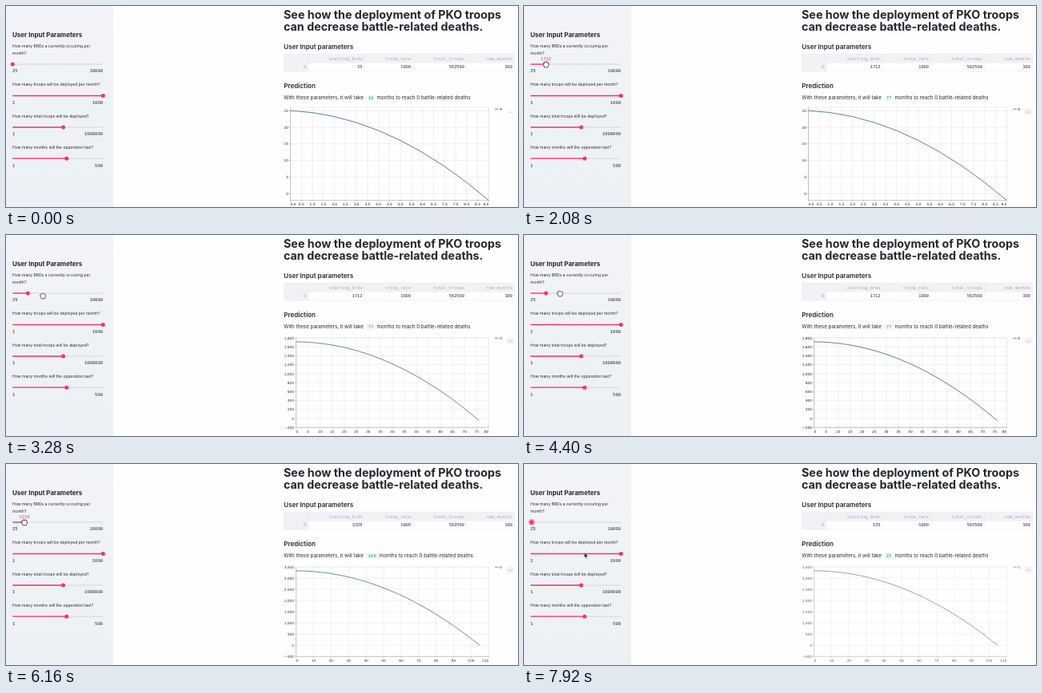
An HTML page that plays this animation: 640x252 px, repeating every 8 s.

```html
<!DOCTYPE html>
<html lang="en">
<head>
<meta charset="utf-8">
<title>Troop deployment dashboard</title>
<style>
html, body { margin: 0; width: 100%; height: 100%; overflow: hidden; background: #fefefe; }
svg { display: block; width: 100vw; height: 100vh; }
text { font: 5px Inter, "Open Sans", sans-serif; fill: #262730; }
.title { font-size: 14.3px; font-weight: 700; }
.head { font-size: 8.05px; font-weight: 600; }
.bold { font-size: 8px; font-weight: 700; }
.body { font-size: 6.25px; }
.mono { font: 5.5px "Liberation Mono", monospace; }
.cell { font: 5.35px "Liberation Mono", monospace; }
.axis { font: 4.3px "DejaVu Sans", sans-serif; fill: #222; }
.grey { fill: #a3a8b4; }
.red { fill: #f63366; }
.green { fill: #09ab3b; }
.end { text-anchor: end; }
.mid { text-anchor: middle; }
</style>
</head>
<body>
<svg id="stage" viewBox="0 0 640 252">
  <defs>
    <linearGradient id="side" x2="0" y2="1">
      <stop stop-color="#f2f4f7"/><stop offset="1" stop-color="#edf0f4"/>
    </linearGradient>
  </defs>
</svg>
<script>
const PINK = '#f63366', stage = document.getElementById('stage');
const $ = id => document.getElementById(id);

const text = (x, y, cls, str, id = '') =>
  `<text x="${x}" y="${y}" class="${cls}"${id && ` id="${id}"`}>${str}</text>`;
const rect = (x, y, w, h, fill) =>
  `<rect x="${x}" y="${y}" width="${w}" height="${h}" fill="${fill}"/>`;
const line = (x1, y1, x2, y2, color, width) =>
  `<path d="M${x1} ${y1}L${x2} ${y2}" stroke="${color}" stroke-width="${width}"/>`;

// Sliders run from x = 8.3 to x = 121.3
const toX = v => 8.3 + (v - 25) / 9975 * 113;

function slider(y, x, label, min, max, id) {
  return text(8, y - 12.4, '', label) +
    line(8.3, y, 121.3, y, '#d3d5da', 1) +
    `<path id="${id}Bar" d="M8.3 ${y}H${x}" stroke="${PINK}" stroke-width="1.3"/>
     <circle id="${id}Glow" cx="${x}" cy="${y}" r="4.2" fill="${PINK}" opacity=".4" display="none"/>
     <circle id="${id}Dot" cx="${x}" cy="${y}" r="2.5" fill="${PINK}"/>` +
    text(8, y + 10.3, 'mono', min) + text(121, y + 10.3, 'mono end', max);
}

// Deaths left after n months
const deaths = (start, n) => start - 0.3 * n * (n + 1);

function chart(id, { start, left, top, bottom, yMin, yMax, yFirst, yStep, xMax, xStep, last }) {
  const right = 603.3;
  const px = v => left + v / xMax * (right - left);
  const py = v => bottom - (v - yMin) / (yMax - yMin) * (bottom - top);
  let out = '';
  for (let v = yFirst; v <= yMax; v += yStep) {
    const y = py(v), name = v.toLocaleString('en-US').replace('-', '\u2212');
    out += line(left, y, right, y, '#ddd', .45) + line(left - 1.9, y, left, y, '#888', .4) +
      text(left - 2.6, y + 1.6, 'axis end', name);
  }
  for (let v = 0; v <= xMax; v += xStep) {
    const x = px(v), cls = v == 0 ? '' : v == xMax ? ' end' : ' mid';
    out += line(x, top, x, bottom, '#ddd', .45) + line(x, bottom, x, bottom + 1.9, '#888', .4) +
      text(x, bottom + 6.3, 'axis' + cls, xStep < 1 ? v.toFixed(1) : v);
  }
  let curve = '';
  for (let n = 0; n <= last; n++) curve += `${px(n)},${py(deaths(start, n))} `;
  return `<g id="${id}">${out}
    <path d="M${left} ${top}V${bottom}H${right}" fill="none" stroke="#888" stroke-width=".45"/>
    <path d="M${left} ${top}H${right}V${bottom}" fill="none" stroke="#ddd" stroke-width=".45"/>
    <polyline points="${curve}" fill="none" stroke="#4c78a8" stroke-width=".95"/></g>`;
}

const columns = [['starting_brds', 445.5, 25], ['troop_rate', 506, 1000],
  ['total_troops', 573, 562500], ['num_months', 633, 300]];

stage.innerHTML += rect(0, 0, 134, 252, 'url(#side)') +
  text(8, 39.2, 'bold', 'User Input Parameters') +
  text(8, 52, '', 'How many BRDs a currently occuring per') +
  slider(73, 8.3, 'month?', 25, 10000, 'brd') +
  slider(112.5, 121.3, 'How many troops will be deployed per month?', 1, 1000, 'rate') +
  slider(152, 71.6, 'How many total troops will be deployed?', 1, 1000000, 'total') +
  slider(191.2, 75.8, 'How many months will the opperation last?', 1, 500, 'span') +
  text(8, 67.9, 'mono red mid', '', 'tip') +

  text(347, 15.5, 'title', 'See how the deployment of PKO troops') +
  text(347, 30.5, 'title', 'can decrease battle-related deaths.') +
  text(347.3, 54, 'head', 'User Input parameters') +
  rect(347.5, 60, 288.5, 11.2, '#f0f2f6') + rect(347.5, 71.2, 30.5, 11, '#f0f2f6') +
  `<path d="M347.5 60H636V82.2H347.5ZM347.5 71.2H636M378 60V82.2M448 60V82.2M509 60V82.2M576 60V82.2"
    fill="none" stroke="#e4e6eb" stroke-width=".4"/>` +
  text(375, 78.4, 'cell grey end', 0) +
  columns.map(([name, x, v], i) => text(x, 67.7, 'cell grey end', name) +
    text(x, 78.4, 'cell end', v, 'cell' + i)).join('') +
  text(347.3, 103.2, 'head', 'Prediction') +
  text(347.3, 117.4, 'body', 'With these parameters, it will take') +
  `<rect id="badge" x="450.3" y="111" height="8.6" rx="1" fill="#f5f6f9"/>` +
  text(452.8, 117.3, 'mono green', '', 'months') +
  text(463.5, 117.4, 'body', 'months to reach 0 battle-related deaths', 'after') +

  '<g id="plot">' +
  chart('c0', { start: 25, left: 355.5, top: 127, bottom: 243.6, yMin: -2, yMax: 26,
    yFirst: 0, yStep: 5, xMax: 9, xStep: .5, last: 9 }) +
  chart('c1', { start: 1712, left: 362.6, top: 129, bottom: 241.3, yMin: -200, yMax: 1800,
    yFirst: -200, yStep: 200, xMax: 80, xStep: 5, last: 76 }) +
  chart('c2', { start: 3326, left: 362.6, top: 129, bottom: 241.3, yMin: -500, yMax: 3500,
    yFirst: -500, yStep: 500, xMax: 110, xStep: 10, last: 105 }) +
  line(611, 129.3, 616, 129.3, '#4c78a8', .8) + text(617.2, 130.9, 'axis', '', 'legend') + '</g>' +
  '<rect id="menu" x="625.5" y="128" width="10" height="9.5" rx="4" fill="#f3f4f6"/>' +
  [628.3, 630.4, 632.5].map(x => `<circle cx="${x}" cy="133" r=".55" fill="#999"/>`).join('') +

  `<g id="cursor" stroke-linejoin="round">
    <path id="hand" d="M-3.2 .4L-3.4-1.2Q-2.9-2-2.2-1.4V-2.4Q-1.5-3.4-.8-2.6Q0-3.6.8-2.6Q1.6-3.2 2.2-2.2Q3.2-2.3 3.4-1.2V1L2.3 3.6H-1.6Z"
      fill="#fff" stroke="#222" stroke-width=".75"/>
    <path id="arrow" d="M0-3.5V3L1.5 1.7L2.6 4.2L3.6 3.7L2.5 1.4H4.6Z"
      fill="#111" stroke="#fff" stroke-width=".4"/></g>`;

// Eased value between [time, value] keys
function ease(t, keys) {
  if (t <= keys[0][0]) return keys[0][1];
  for (let i = 1; i < keys.length; i++) {
    const [a, from] = keys[i - 1], [b, to] = keys[i];
    if (t <= b) {
      const k = (t - a) / (b - a);
      return from + (to - from) * k * k * (3 - 2 * k);
    }
  }
  return keys[keys.length - 1][1];
}
// Latest value whose time has come
const step = (t, keys) => keys.filter(k => k[0] <= t).pop()[1];
const within = (t, a, b) => t >= a && t < b;
const show = (id, on) => $(id).setAttribute('display', on ? 'inline' : 'none');
const set = (id, str) => { if ($(id).textContent != str) $(id).textContent = str; };

const drag = [[960, 25], [1440, 1712], [4400, 1712], [4470, 3326], [5840, 3326],
  [6400, 25], [6720, 25], [6870, 135]];
const stale = [[1920, 1], [2720, .7], [2840, .7], [3500, 1], [4880, 1], [5680, .7],
  [5720, .7], [6400, 1], [7120, 1], [7920, .7]];
const awayX = [[300, 60], [900, 8.5], [2160, 27.5], [2700, 46], [4080, 46], [4160, 45.5],
  [7120, 9.5], [7840, 75.5]];
const awayY = [[300, 100], [900, 73], [2160, 73], [2700, 76.3], [4080, 76.3], [4160, 73.3],
  [7120, 73.3], [7840, 114.5]];

function frame() {
  const t = performance.now() % 8000;
  const v = Math.round(ease(t, drag)), x = toX(v);
  const held = within(t, 900, 2160) || within(t, 4470, 7120);

  $('brdBar').setAttribute('d', `M8.3 73H${x}`);
  $('brdDot').setAttribute('cx', x);
  $('brdGlow').setAttribute('cx', x);
  show('brdGlow', within(t, 960, 3200) || t >= 4470);
  $('tip').setAttribute('x', x);
  set('tip', v);
  show('tip', within(t, 900, 3200) || within(t, 4470, 7300));

  set('cell0', step(t, [[0, 25], [1920, 1712], [4960, 3326], [7160, 135]]));
  const months = String(step(t, [[0, 10], [1960, 77], [5720, 106], [7200, 22]]));
  const extra = 3.3 * (months.length - 2);
  set('months', months);
  $('badge').setAttribute('width', 11.4 + extra);
  $('after').setAttribute('x', 463.5 + extra);

  const current = step(t, [[0, 0], [2840, 1], [5720, 2]]);
  for (let i = 0; i < 3; i++) show('c' + i, i == current);
  $('plot').setAttribute('opacity', ease(t, stale));
  set('legend', t < 2760 ? 9 : 0);
  show('menu', t >= 1920);

  const pointer = t < 860 || t >= 7200;
  show('cursor', within(t, 300, 4880) || t >= 5760);
  show('hand', !pointer);
  show('arrow', pointer);
  $('cursor').setAttribute('transform',
    `translate(${held ? x : ease(t, awayX)} ${held ? 73.3 : ease(t, awayY)})`);
  requestAnimationFrame(frame);
}
frame();
</script>
</body>
</html>
```
